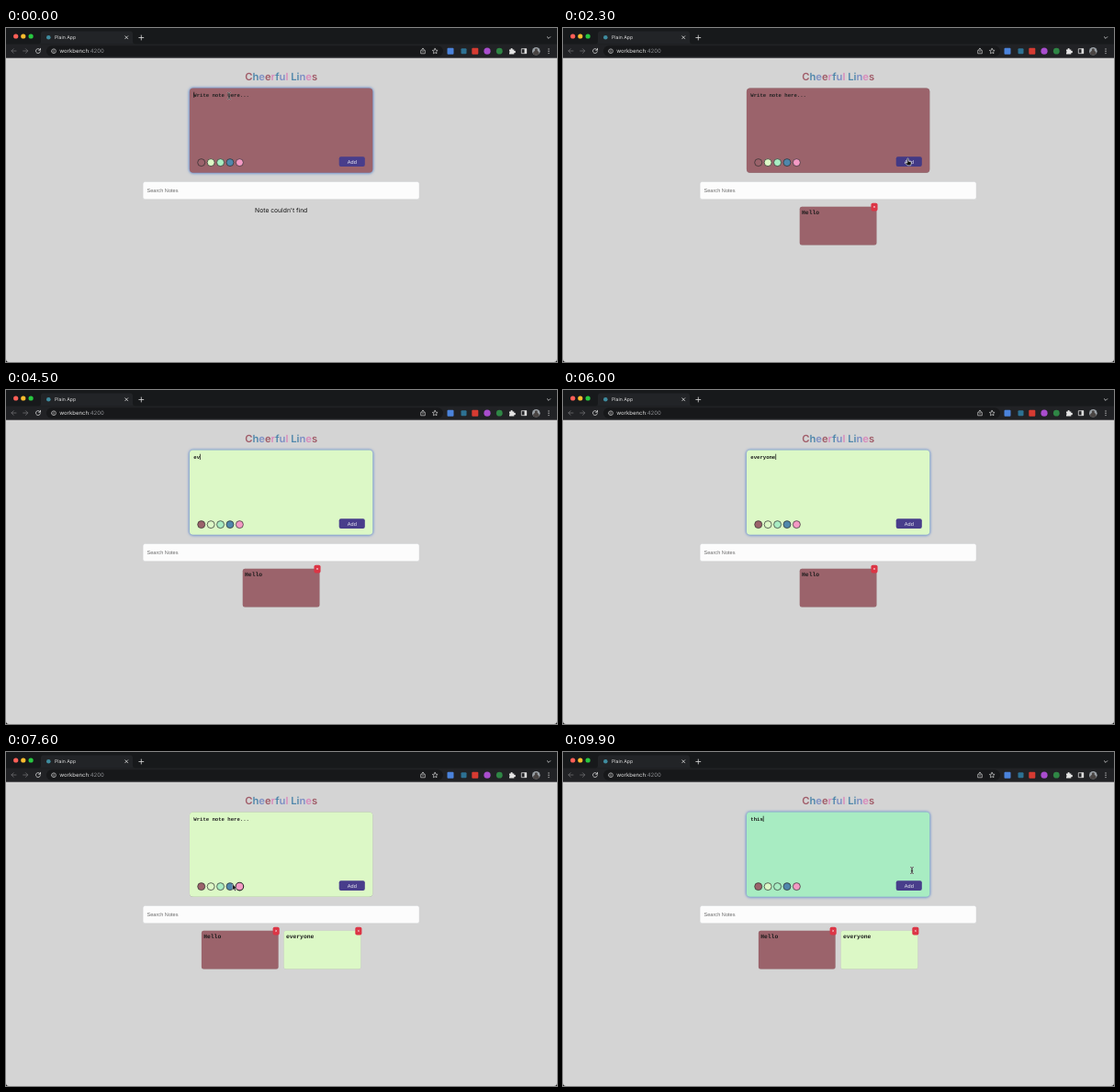
Write an HTML page that moves like this. It is 600x364 px and loops after 10 s.

```html
<!DOCTYPE html>
<html lang="en">
<head>
<meta charset="utf-8">
<title>Notes</title>
<style>
  html, body { margin: 0; width: 100%; height: 100%; overflow: hidden; background: #d3d3d3; }
  svg { display: block; width: 100vw; height: 100vh; }
  text { font-family: Inter, sans-serif; text-rendering: geometricPrecision; white-space: pre; }
  .mono { font-family: "Liberation Mono", monospace; font-weight: 700; }
  .form { font-family: "Liberation Sans", sans-serif; }
  .line { fill: none; stroke: #dcdcdc; stroke-width: .8; stroke-linecap: round; stroke-linejoin: round; }
  .thin { stroke-width: .65; }
  .dim { stroke: #6c6d70; }
</style>
</head>
<body>
<svg id="stage" viewBox="0 0 600 364">
  <defs>
    <filter id="glow" x="-10%" y="-15%" width="120%" height="130%"><feGaussianBlur stdDeviation="1.5"/></filter>
    <filter id="soft" x="-10%" y="-15%" width="120%" height="130%"><feGaussianBlur stdDeviation=".6"/></filter>
  </defs>
  <rect width="600" height="364" fill="#d4d4d4"/>

  <!-- browser window -->
  <rect width="600" height="32.700" fill="#212225"/>
  <rect width="600" height="17.500" fill="#17191b"/>
  <path d="M35 17.500q3 0 3-3V6.500q0-3 3-3H135q3 0 3 3v8q0 3 3 3z" fill="#222427"/>
  <circle cx="10.700" cy="9" r="2.600" fill="#ff5f57"/>
  <circle cx="18.800" cy="9" r="2.600" fill="#febc2e"/>
  <circle cx="27.100" cy="9" r="2.600" fill="#28c840"/>
  <circle cx="46.300" cy="10.300" r="2.300" fill="#3f8c9f"/>
  <text x="53" y="12.200" font-size="5.200" fill="#dedede">Plain App</text>
  <path class="line" d="M129.700 8.800l3 3m0-3l-3 3M144.800 10.500h5m-2.500-2.500v5M589.300 9.700l1.700 1.700 1.700-1.700"/>
  <path class="line dim" d="M11 25H6m2.200-2.300L5.900 25l2.300 2.300M18.700 25h5m-2.200-2.300l2.300 2.300-2.300 2.300"/>
  <path class="line" d="M37.200 23.800a2.500 2.500 0 1 0 .2 2M37.500 22.300v1.900h-1.900"/>
  <rect x="44" y="19.300" width="432" height="11.700" rx="5.800" fill="#17181a"/>
  <path class="line thin" d="M49.600 25.200a2.400 2.400 0 1 0 4.800 0 2.400 2.400 0 1 0-4.800 0M52 25v1.300m0-2.400v.1"/>
  <text x="58.200" y="27.200" font-size="6" fill="#e6e6e6">workbench<tspan fill="#8d8f93">:4200</tspan></text>
  <path class="line thin" d="M452.500 24.300h-.8v3.500h4.600v-3.500h-.8M454 26v-3.800m-1.300 1.200l1.300-1.300 1.300 1.300"/>
  <path class="line thin" d="M467.200 22.300l.9 1.900 2 .2-1.500 1.400.4 2-1.800-1-1.800 1 .4-2-1.500-1.400 2-.2z"/>
  <path class="line" d="M561.700 22.700h5v5h-5z"/>
  <rect x="564.500" y="22.500" width="2.500" height="5.400" fill="#dcdcdc"/>
  <rect x="480.500" y="21.700" width="7" height="7" rx="1" fill="#4b83dc"/>
  <rect x="495.500" y="22.200" width="6" height="6" rx="1" fill="#2d7193"/>
  <rect x="507.300" y="21.700" width="7" height="7" rx="1" fill="#d63b32"/>
  <circle cx="524" cy="25.200" r="3.600" fill="#a94dce"/>
  <circle cx="537.300" cy="25.200" r="3.400" fill="#2f8645"/>
  <path d="M548 23.500h1.600a1.100 1.100 0 1 1 2 0h1.700v1.500a1.100 1.100 0 1 1 0 2v1.500h-5.300v-1.600a1.100 1.100 0 0 0 0-1.900z" fill="#e4e4e4"/>
  <circle cx="577.300" cy="25.200" r="4.300" fill="#9aa0a6"/>
  <path d="M574 28a3.300 3.300 0 0 1 6.600 0 4.300 4.300 0 0 1-6.600 0z" fill="#4a4543"/>
  <circle cx="577.300" cy="23.900" r="1.600" fill="#4a4543"/>
  <path class="line" d="M591 22.900v.1m0 2.200v.1m0 2.200v.1" style="stroke-width:1.200"/>

  <!-- page -->
  <text id="title" x="299.700" y="56.700" font-size="11.200" font-weight="600" text-anchor="middle"></text>
  <rect id="shade" x="199.900" y="65.600" width="199.400" height="92.300" rx="4"/>
  <rect id="pad" x="199.900" y="65.400" width="199.400" height="92.400" rx="4"/>
  <text id="draft" class="mono" x="204.300" y="74.800" font-size="5.620"></text>
  <path id="caret" d="M0 69.700v6.300" stroke="#111" stroke-width=".7"/>
  <g id="swatches" stroke="#2b2b2b"></g>
  <rect id="add" x="362.700" y="140.200" width="28.100" height="10.700" rx="2"/>
  <text class="form" x="376.800" y="147.500" font-size="5.600" fill="#eeeef6" text-anchor="middle">Add</text>
  <rect x="149.100" y="167.400" width="301" height="19.300" rx="2.500" fill="#fcfcfc" stroke="#c8cacc" stroke-width=".4"/>
  <text class="form" x="153.500" y="179" font-size="5.620" fill="#6c6c6c">Search Notes</text>
  <text id="empty" x="299.700" y="201.300" font-size="6.750" text-anchor="middle" fill="#111">Note couldn't find</text>
  <g id="notes"></g>
  <g id="pointer" stroke-linejoin="round">
    <path id="arrow" d="M0 0v6.600l1.500-1.300 1 2.300 1.200-.5-1-2.300h2z" fill="#111" stroke="#fff" stroke-width=".4"/>
    <g id="ibeam" fill="none" stroke-linecap="round">
      <path d="M-1.500-3.500q1.500 0 1.500 1v5q0 1-1.500 1M1.500-3.500q-1.500 0-1.500 1v5q0 1 1.500 1M-.8 .7h1.600" stroke="#fff" stroke-opacity=".6" stroke-width="1.500"/>
      <path d="M-1.500-3.500q1.500 0 1.500 1v5q0 1-1.500 1M1.500-3.500q-1.500 0-1.500 1v5q0 1 1.500 1M-.8 .7h1.600" stroke="#222" stroke-width=".7"/>
    </g>
    <path id="hand" d="M-.7-3q.7-.8 1.400 0v2.600l2.300.6q1 .3.800 1.400l-.6 2.700h-3.700l-2.200-2.600q-.2-1 .8-.8l1.200.8z" fill="#111" stroke="#fff" stroke-width=".6"/>
  </g>
  <path d="M0 361v3h3q-3 0-3-3zM600 361v3h-3q3 0 3-3z" fill="#111"/>
</svg>
<script>
const $ = id => document.getElementById(id);
const LOOP = 10000, STEP = 100;
const RED = '#9b636b', LIME = '#dcf8c6', MINT = '#a8ecc2', BLUE = '#5087ab', PINK = '#f49ac4';
const palette = [RED, LIME, MINT, BLUE, PINK];
const swatchX = i => 212.7 + 10.42 * i, swatchY = 146.6;

// Pointer keys: time, x, y
const path = [
  [0, 243, 74], [1300, 243, 74], [1900, 375.5, 145.5], [2400, 375.5, 145.5],
  [2900, 223.7, 145.6], [3200, 223.7, 145.6], [3500, 243, 104], [6200, 243, 104],
  [6800, 375.5, 145.5], [7200, 375.5, 145.5], [7500, 253, 144.5], [7600, 246.7, 144],
  [7900, 235, 144], [8300, 235, 144], [8500, 280, 110], [8700, 280, 110], [9000, 380, 129]
];
// Typed text: time, content
const drafts = [
  [0, ''], [300, 'H'], [400, 'He'], [600, 'Hel'], [800, 'Hell'], [1000, 'Hello'], [2000, ''],
  [4300, 'e'], [4500, 'ev'], [4800, 'eve'], [5100, 'ever'], [5400, 'every'], [5600, 'everyo'],
  [5800, 'everyon'], [5900, 'everyone'], [6900, ''],
  [9300, 't'], [9500, 'th'], [9700, 'thi'], [9800, 'this']
];
const colors = [[0, RED], [3000, LIME], [8100, MINT]];
const focus = [[0, true], [2000, false], [3500, true], [6900, false], [8500, true]];
const pointerShown = [[0, true], [300, false], [1400, true], [4300, false], [6300, true], [9300, false], [9900, true]];
const saved = [[2000, 'Hello', RED], [6900, 'everyone', LIME]];

const latest = (keys, t) => keys.findLast(k => k[0] <= t)[1];
const show = (id, on) => $(id).setAttribute('visibility', on ? 'visible' : 'hidden');
const set = (el, attrs) => { for (const k in attrs) el.setAttribute(k, attrs[k]); };

function pointerAt(t) {
  const i = path.findLastIndex(k => k[0] <= t);
  const a = path[i], b = path[i + 1] || a;
  const u = b === a ? 0 : (t - a[0]) / (b[0] - a[0]);
  const e = u * u * (3 - 2 * u);
  return [a[1] + (b[1] - a[1]) * e, a[2] + (b[2] - a[2]) * e];
}

const noteMarkup = ([, text, color], x) => `
  <g transform="translate(${x} 194.800)">
    <rect width="83.700" height="42" rx="2.500" fill="#888" opacity=".4" filter="url(#soft)"/>
    <rect width="83.700" height="41.800" rx="2.500" fill="${color}"/>
    <text class="mono" x="2.300" y="8.100" font-size="6.350" fill="#1a1a1a">${text}</text>
    <rect x="77.700" y="-4.100" width="7.100" height="8.700" rx="1.900" fill="#dc3545"/>
    <path d="M80.300-.8l1.900 1.900m0-1.900l-1.900 1.900" stroke="#fff" stroke-width=".5"/>
  </g>`;

const inks = ['#a05c68', '#5087ab', '#7d8fc4', '#d88abb'];
const inkOrder = [0, 1, 2, 0, 3, 1, 2, 3, 0, 1, 1, 2, 3, 0];
$('title').innerHTML = [...'Cheerful Lines'].map((c, i) => `<tspan fill="${inks[inkOrder[i]]}">${c}</tspan>`).join('');
$('swatches').innerHTML = palette.map((c, i) => `<circle cx="${swatchX(i)}" cy="${swatchY}" fill="${c}"/>`).join('');

let noteCount = -1;
function draw(t) {
  const draft = latest(drafts, t), focused = latest(focus, t), [x, y] = pointerAt(t);
  set($('pad'), { fill: latest(colors, t) });
  set($('shade'), focused
    ? { fill: '#5a86cc', stroke: '#5a86cc', 'stroke-width': 1.2, filter: 'url(#glow)' }
    : { fill: '#999', stroke: 'none', 'stroke-width': 0, filter: 'url(#soft)' });
  $('draft').textContent = draft || 'Write note here...';
  set($('draft'), { fill: draft ? '#1a1a1a' : '#222' });
  set($('caret'), { transform: `translate(${204.7 + draft.length * 3.372})` });
  show('caret', focused);

  // The hover ring trails the pointer by one step
  const [hx, hy] = pointerAt(Math.max(0, t - STEP));
  [...$('swatches').children].forEach((dot, i) => {
    const over = Math.hypot(hx - swatchX(i), hy - swatchY) < 4.7;
    set(dot, { r: over ? 4.3 : 4, 'stroke-width': over ? 1.1 : .7 });
  });

  const overAdd = x > 363 && x < 390.6 && y > 140.5 && y < 151;
  const overText = !overAdd && x > 200 && x < 399 && y > 66 && y < 138;
  set($('add'), { fill: overAdd ? '#423985' : '#483d8b' });
  set($('pointer'), { transform: `translate(${x} ${y})` });
  const shown = latest(pointerShown, t);
  show('hand', shown && overAdd);
  show('ibeam', shown && overText);
  show('arrow', shown && !overAdd && !overText);

  const list = saved.filter(n => n[0] <= t);
  if (list.length !== noteCount) {
    noteCount = list.length;
    const left = 302.6 - noteCount * 44.85;
    $('notes').innerHTML = list.map((n, i) => noteMarkup(n, left + i * 89.7)).join('');
    show('empty', !noteCount);
  }
}

const start = performance.now();
function tick() {
  const t = (performance.now() - start) % LOOP;
  draw(Math.floor(t / STEP) * STEP);
  requestAnimationFrame(tick);
}
tick();
</script>
</body>
</html>
```
